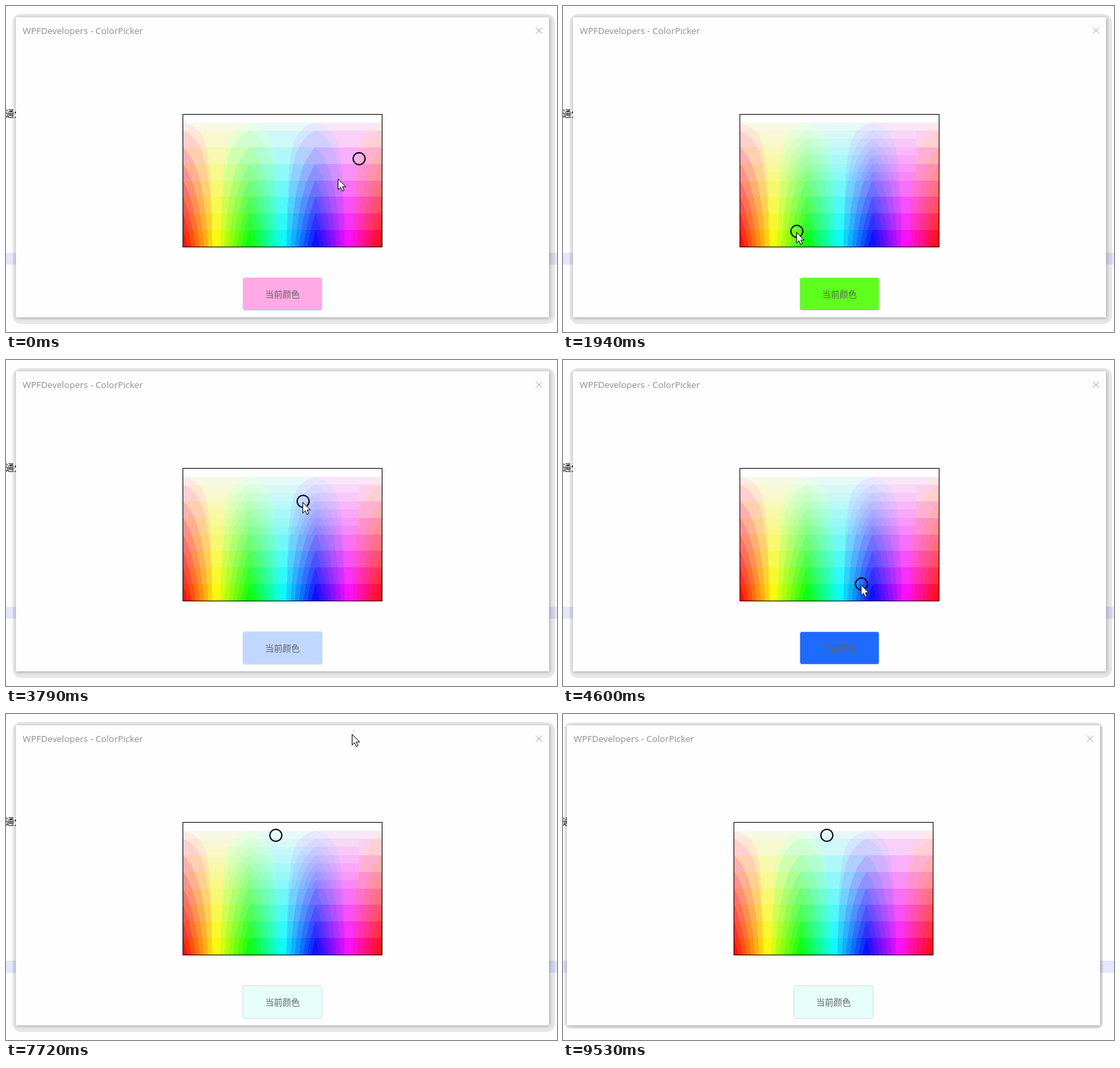
An HTML page with a canvas for the animation above (9650 ms loop, 827 by 489 pixels).

```html
<!DOCTYPE html>
<html lang="zh">
<head>
<meta charset="utf-8">
<title>ColorPicker</title>
<style>
html, body { margin: 0; width: 100%; height: 100%; overflow: hidden; background: #fefefe; }
canvas { display: block; }
</style>
</head>
<body>
<canvas id="stage" width="827" height="489"></canvas>
<script>
const ctx = document.getElementById('stage').getContext('2d');
const LOOP = 9650, STEPS = 72, DRAG_END = 43, MOVE_AT = 71;
const W = 298, H = 198, LEFT = 266, TOP = 163;
const CJK = '"Noto Sans CJK SC", "Noto Sans CJK", sans-serif';

// Turning points of the pointer: step, x, y
const path = [
  [0, 498, 259], [8, 439, 341], [14, 350, 339], [18, 298, 306], [22, 314, 207], [25, 340, 191],
  [31, 550, 235], [34, 447, 337], [40, 281, 235], [DRAG_END, 404, 183], [45, 412, 215],
  [50, 675, 500], [52, 675, 500], [57, 519, 30], [62, 510, 30], [68, 690, 500]
];

function pointerAt(step) {
  const i = path.findIndex(k => k[0] > step);
  if (i < 0) return path.at(-1).slice(1);
  const [s0, x0, y0] = path[i - 1], [s1, x1, y1] = path[i];
  const f = (step - s0) / (s1 - s0);
  return [x0 + (x1 - x0) * f, y0 + (y1 - y0) * f].map(Math.round);
}

// The ring follows the pointer from the first press until the drag ends
function ringAt(step) {
  if (!step) return [530, 229];
  const [x, y] = pointerAt(Math.min(step, DRAG_END));
  return [x + 1, y - 1];
}

// Hue runs from left to right, saturation from top to bottom
function colorAt(x, y) {
  const h = (x - LEFT) / W * 6, s = (y - TOP) / H;
  return [0, 4, 2].map(shift => {
    const pure = Math.min(1, Math.max(0, Math.abs((h + shift) % 6 - 3) - 1));
    return 255 * (1 - s + s * pure);
  });
}

// The colour field, reduced to a number of levels per channel
function spectrum(levels) {
  const c = document.createElement('canvas');
  c.width = W;
  c.height = H;
  const g = c.getContext('2d'), img = g.createImageData(W, H), size = 256 / levels;
  for (let y = 0, p = 0; y < H; y++) {
    const peak = 240 - 16 * y / H;
    for (let x = 0; x < W; x++) {
      const rgb = colorAt(LEFT + x + .5, TOP + y + .5);
      const bright = rgb.filter(v => v >= peak).length === 2 ? 248 : 254;
      for (const v of rgb) {
        const low = Math.floor(v / size) * size;
        img.data[p++] = v >= peak ? bright : (low + Math.min(low + size, peak)) / 2;
      }
      img.data[p++] = 255;
    }
  }
  g.putImageData(img, 0, 0);
  return c;
}
const coarse = spectrum(8), fine = spectrum(16);

function roundBox(x, y, w, h, r) {
  ctx.beginPath();
  ctx.roundRect(x, y, w, h, r);
}

function label(text, x, y, font, color) {
  ctx.font = font;
  ctx.fillStyle = color;
  ctx.fillText(text, x, y);
}

function drawDesktop(moved) {
  ctx.fillStyle = '#fefefe';
  ctx.fillRect(0, 0, 827, 489);
  ctx.fillStyle = '#e6e6fd';
  ctx.fillRect(0, 370, 827, 18);
  ctx.fillStyle = 'rgba(0,0,0,.09)';
  if (moved) roundBox(2, 13, 808, 459, 9);
  else roundBox(10, 12, 814, 465, 13);
  ctx.fill();
  label('通分', -1, 166, '13px ' + CJK, '#000');
}

function drawWindow(ring, mixed) {
  ctx.save();
  ctx.shadowColor = 'rgba(0,0,0,.3)';
  ctx.shadowBlur = 5;
  ctx.shadowOffsetX = ctx.shadowOffsetY = 1;
  ctx.fillStyle = '#fefefe';
  ctx.fillRect(15, 17, 800, 450);
  ctx.restore();

  label('WPFDevelopers - ColorPicker', 25, 42, '13.45px "Open Sans", "Noto Sans", sans-serif', '#8c8e92');
  ctx.strokeStyle = '#a4a6aa';
  ctx.lineWidth = 1;
  ctx.beginPath();
  ctx.moveTo(795.5, 32.5);
  ctx.lineTo(804.5, 41.5);
  ctx.moveTo(804.5, 32.5);
  ctx.lineTo(795.5, 41.5);
  ctx.stroke();

  ctx.fillStyle = '#000';
  ctx.fillRect(LEFT - 1, TOP - 1, W + 2, H + 2);
  ctx.drawImage(coarse, LEFT, TOP);
  // Redrawn parts show smoother colour
  if (mixed) ctx.drawImage(fine, 34, 25, 230, 74, LEFT + 34, TOP + 25, 230, 74);

  ctx.strokeStyle = '#000';
  ctx.lineWidth = 2;
  ctx.beginPath();
  ctx.arc(...ring, 9, 0, 7);
  ctx.stroke();

  ctx.fillStyle = `rgb(${colorAt(...ring).map(Math.round)})`;
  roundBox(355.5, 407.5, 119, 49, 3);
  ctx.fill();
  ctx.strokeStyle = '#d8dce6';
  ctx.lineWidth = 1;
  ctx.stroke();
  label('当前颜色', 389, 437, '13px ' + CJK, '#606266');
}

const arrow = new Path2D('M0 0V16L3.7 12.5L6.2 18.2L8.8 17L6.4 11.5H11.4Z');

function drawCursor(x, y) {
  ctx.save();
  ctx.translate(x + .5, y + .5);
  ctx.fillStyle = '#fff';
  ctx.strokeStyle = '#000';
  ctx.lineWidth = 1;
  ctx.fill(arrow);
  ctx.stroke(arrow);
  ctx.restore();
}

function draw(now) {
  const step = Math.floor(now % LOOP / LOOP * STEPS);
  const moved = step >= MOVE_AT;
  drawDesktop(moved);
  ctx.save();
  if (moved) ctx.translate(-9, 0);
  drawWindow(ringAt(step), step > 0 && !moved);
  ctx.restore();
  drawCursor(...pointerAt(step));
}

let start;
function loop(now) {
  start ??= now;
  draw(Math.max(0, now - start));
  requestAnimationFrame(loop);
}
draw(0);
requestAnimationFrame(loop);
</script>
</body>
</html>
```
